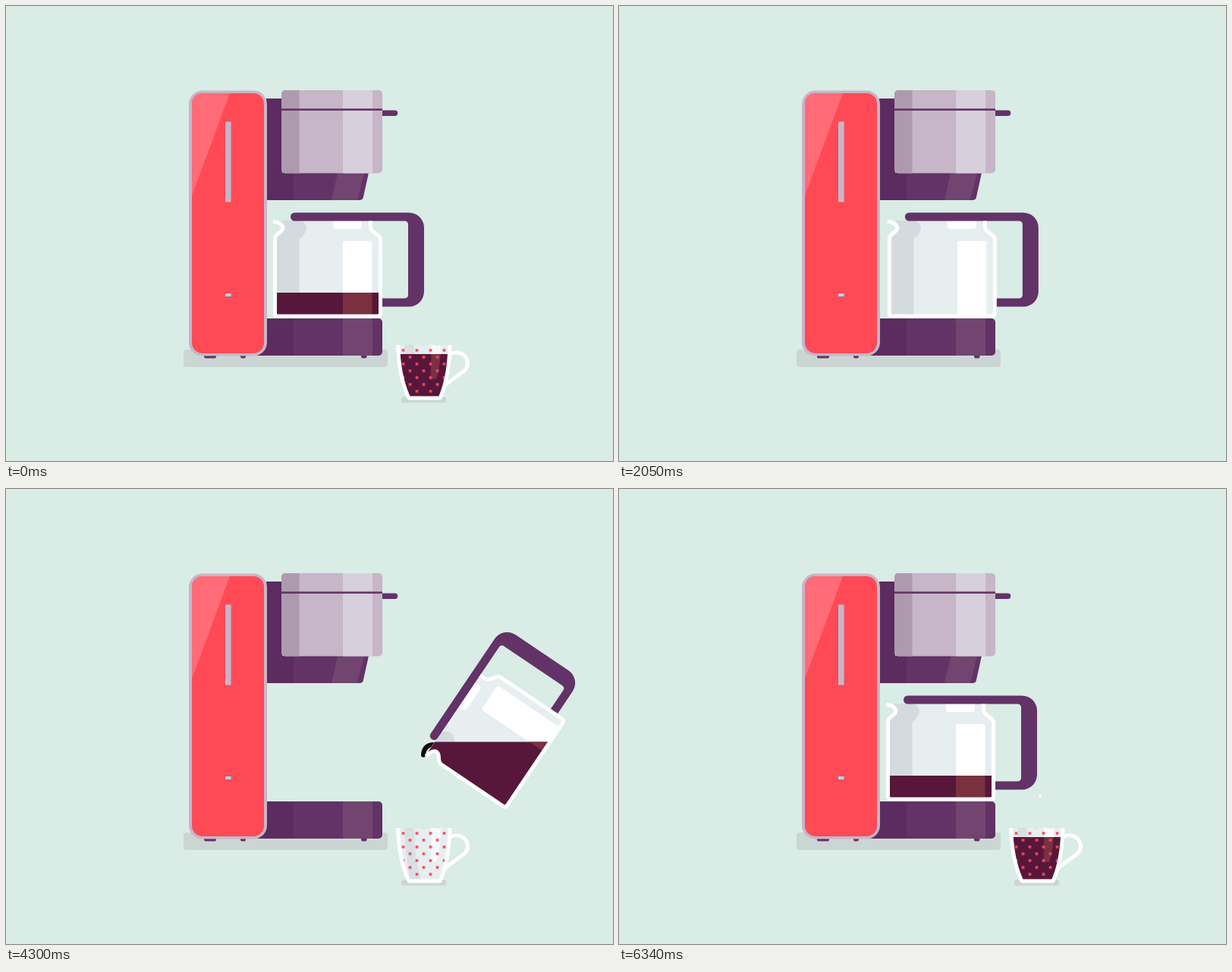
These frames come from a looping animation (800x600 px, 6.4 s). An HTML page:

```html
<!DOCTYPE html>
<html lang="en">
<head>
<meta charset="utf-8">
<title>Coffee maker</title>
<style>
  html, body { margin: 0; height: 100%; overflow: hidden; background: #d9ece5; }
  svg { display: block; width: 100vw; height: 100vh; }
  .red { fill: #ff4a56 } .gloss { fill: #ff6b76 }
  .plum { fill: #633267 } .plumDark { fill: #5c2b60 } .plumLight { fill: #71456f }
  .lilac { fill: #c6b6c8 } .lilacDark { fill: #ae9aae } .lilacLight { fill: #d8cfdd }
  .glass { fill: #e6eef0 } .shade { fill: #d4dbde } .white { fill: #fff }
  .coffee { fill: #57173a } .coffeeLight { fill: #7b3040 }
  .shadow { fill: #cbd6d4 }
  .line { fill: none; stroke: #fff; stroke-width: 5; stroke-linecap: round; stroke-linejoin: round }
  .stream { fill: none; stroke: #0d0709; stroke-width: 6; stroke-linecap: round }
</style>
</head>
<body>
<svg viewBox="0 0 800 600">
  <defs>
    <clipPath id="bodyClip"><rect x="245" y="115" width="95" height="343" rx="14"/></clipPath>
    <clipPath id="basketClip"><rect x="363" y="111" width="133" height="109.500" rx="5"/></clipPath>
    <clipPath id="baseClip"><rect x="325" y="412" width="171" height="49" rx="5"/></clipPath>
    <clipPath id="spoutClip"><path d="M344 220H478L470.800 252.500Q470 256 466 256H344Z"/></clipPath>
    <clipPath id="potClip"><path d="M353 283H480V294L492 306V407H356.500V304L366 294Z"/></clipPath>
    <clipPath id="stripClip"><rect x="444" y="310" width="38.500" height="96.500"/></clipPath>
    <clipPath id="cupClip"><path id="cupShape" d="M517 447Q518 490 532 515.500H571Q584 490 585 447Z"/></clipPath>
    <clipPath id="cupGloss"><path d="M560 447H573Q573 475 567 492H559Q561 475 560 447Z"/></clipPath>
    <pattern id="dots" x="521.700" y="452.300" width="18" height="18" patternUnits="userSpaceOnUse">
      <path fill="#f2495c" d="M0 0h3.600v3.600h-3.600zM9 9h3.600v3.600h-3.600z"/>
    </pattern>
  </defs>

  <rect id="shadow" class="shadow" x="234" y="453" width="269" height="23" rx="4"/>
  <g id="feet" class="plum">
    <rect x="261" y="457" width="16" height="7.500" rx="2"/>
    <rect x="309" y="457" width="7" height="7.500" rx="2"/>
    <rect x="468" y="457" width="7.500" height="7.500" rx="2"/>
  </g>

  <g id="cup">
    <rect class="shadow" x="521" y="515.500" width="59" height="7.500" rx="3"/>
    <path class="line" d="M582 462C588 456 597 455 603 460C610 466 610 475 604 481L577 501"/>
    <g clip-path="url(#cupClip)">
      <rect class="glass" x="510" y="447" width="80" height="72"/>
      <path class="shade" d="M525 447H538Q538 485 547 516H533Q526 485 525 447Z" opacity=".7"/>
      <path class="white" d="M560 447H573Q573 475 567 492H559Q561 475 560 447Z" opacity=".7"/>
      <path id="pour" class="stream" pathLength="1" d="M565 337Q550 337 550 352V512"/>
      <rect class="coffee cupCoffee" x="510" y="459" width="80" height="70"/>
      <g clip-path="url(#cupGloss)"><rect class="coffeeLight cupCoffee" x="510" y="459" width="80" height="70"/></g>
      <rect fill="url(#dots)" x="510" y="447" width="80" height="72"/>
    </g>
    <path class="line" style="stroke-linecap:butt" d="M516.500 447Q518 490 531 517H572Q584 490 585 447"/>
  </g>
  <path id="pourAir" class="stream" pathLength="1" d="M565 337Q550 337 550 352V512" clip-path="inset(0)"/>

  <g id="pot">
    <path class="glass" d="M353 283H480V294L493 306V409H355V304L366 294Z"/>
    <path class="shade" d="M357 304L367 293L362 283H388Q396 285 396 295Q394 302 386.500 307V408H357Z"/>
    <path class="white" d="M431 283H469V290Q469 294 465 294H435Q431 294 431 290Z"/>
    <rect class="white" x="444" y="310" width="38.500" height="98" rx="3"/>
    <path id="drip" class="stream" pathLength="1" d="M424 253V400"/>
    <g clip-path="url(#potClip)"><rect class="coffee potCoffee" x="224" y="346" width="400" height="300"/></g>
    <g clip-path="url(#stripClip)"><rect class="coffeeLight potCoffee" x="224" y="346" width="400" height="300"/></g>
    <path class="plum" d="M380.500 272.500H531A20 20 0 0 1 551 292.500V376.500A20 20 0 0 1 531 396.500H495V385.500H525Q530 385.500 530 380.500V288.500Q530 283.500 525 283.500H380.500A5.500 5.500 0 0 1 380.500 272.500Z"/>
    <path class="line" style="stroke-linecap:butt" d="M352 284Q364 286 365 292Q365 296 359 300Q354.500 303 354.500 308V405Q354.500 409 358.500 409H489.500Q493.500 409 493.500 405V308Q493.500 305 491 303L482.500 296Q480.500 294 480.500 291V283.500"/>
  </g>

  <g id="machine">
    <g id="arms">
      <rect class="plumDark" x="343" y="122" width="21" height="134"/>
      <g clip-path="url(#spoutClip)">
        <rect class="plum" x="344" y="220" width="140" height="36"/>
        <rect class="plumDark" x="344" y="220" width="35" height="36"/>
        <path class="plumLight" d="M437 220H472L463 256H429Z"/>
      </g>
      <g clip-path="url(#baseClip)">
        <rect class="plum" x="325" y="412" width="171" height="49"/>
        <rect class="plumDark" x="325" y="412" width="54" height="49"/>
        <rect class="plumLight" x="444" y="412" width="39" height="49"/>
      </g>
    </g>
    <g id="basket" clip-path="url(#basketClip)">
      <rect class="lilac" x="363" y="111" width="133" height="110"/>
      <rect class="lilacDark" x="363" y="111" width="23.500" height="110"/>
      <rect class="lilacLight" x="444" y="111" width="39" height="110"/>
    </g>
    <rect id="seam" class="plum" x="363" y="135.300" width="133" height="2.600"/>
    <path id="grip" class="plum" d="M496 137.500H512.500A3.700 3.700 0 0 1 512.500 145H496Z"/>
    <g id="body">
      <rect class="lilac" x="241" y="111.500" width="103" height="350" rx="18"/>
      <g clip-path="url(#bodyClip)">
        <rect class="red" x="245" y="115" width="95" height="343"/>
        <path class="gloss" d="M245 115H295L245 250Z"/>
      </g>
      <rect class="lilac" x="289" y="152.500" width="7.600" height="106"/>
      <rect fill="#9adcf0" x="289" y="379" width="7.600" height="4"/>
    </g>
  </g>

  <path id="steam" class="line" style="stroke-width:3" pathLength="1" d="M551 450Q545 440 550 430T555 404.500"/>
</svg>

<script>
const LOOP = 6400, HOLD = 1000, TICK = 30;
const $ = id => document.getElementById(id);
const all = name => document.querySelectorAll('.' + name);

const linear = p => p;
const easeOut = p => 1 - (1 - p) ** 3;
const easeInOut = p => p < .5 ? 2 * p * p : 1 - 2 * (1 - p) ** 2;
const mix = (a, b, p) => a + (b - a) * p;
const span = (t, from, to, ease = linear) =>
  ease(Math.min(1, Math.max(0, (t - from) / (to - from))));

const move = (el, transform) => el.setAttribute('transform', transform);
const show = (el, visible) => el.style.display = visible ? '' : 'none';

function scaleFrom(id, x, y, sx, sy) {
  show($(id), sx > 0 && sy > 0);
  move($(id), `translate(${x} ${y}) scale(${sx} ${sy}) translate(${-x} ${-y})`);
}

// Shows only the part of a path between two fractions of its length.
function trim(id, from, to) {
  const el = $(id);
  show(el, to > from);
  el.style.strokeDasharray = `${Math.max(0, to - from)} 2`;
  el.style.strokeDashoffset = -from;
}

function drawMachine(t) {
  scaleFrom('body', 292, 462, 1, span(t, 1060, 1300, easeOut));
  scaleFrom('arms', 344, 256, span(t, 1250, 1450, easeOut), 1);
  scaleFrom('basket', 430, 220, 1, span(t, 1390, 1560, easeOut));
  scaleFrom('seam', 363, 136, span(t, 1600, 1697), 1);
  scaleFrom('grip', 496, 141, span(t, 1690, 1800, easeOut), 1);
  move($('machine'), `translate(0 ${mix(3, 0, span(t, 1720, 1900, easeInOut))})`);
  show($('feet'), t > 1700);
  scaleFrom('shadow', 368.5, 476, span(t, 1700, 1950, easeOut), 1);
}

function drawPot(t) {
  const entry = 447 * (1 - span(t, 1630, 2130, easeOut));
  const away = span(t, 3700, 4200, easeInOut) - span(t, 5150, 5680, easeInOut);
  const angle = t < 4300 ? -56 * span(t, 3820, 4290, easeInOut)
    : mix(-56, -60, span(t, 4300, 4950)) * (1 - span(t, 4950, 5590, easeInOut));
  const slosh = t < 4300 ? 4 * Math.sin(span(t, 3700, 4300) * 2 * Math.PI)
    : t > 4950 ? 3.2 * Math.sin((t - 4950) * .00714) * Math.exp((5170 - t) / 250) : 0;

  const poured = span(t, 4400, 5080);
  const rest = mix(64, 15, span(t, 2180, 2800)) + 17 * poured;
  const level = rest + angle / 56 * mix(9, 15, poured);

  show($('pot'), t >= 1630);
  move($('pot'), `translate(${424 + 221 * away + entry} ${346 - 18.5 * away}) rotate(${angle}) translate(-424 -346)`);
  for (const el of all('potCoffee'))
    move(el, `rotate(${slosh - angle} 424 346) translate(0 ${level})`);

  if (t < 2820) trim('drip', span(t, 2700, 2820), span(t, 2100, 2220));
  else trim('drip', 0, .022 * Math.sin(Math.PI * span(t, 2820, 2930)) - .001);
}

function drawCup(t) {
  show($('cup'), t >= 3000);
  move($('cup'), `translate(${290 * (1 - span(t, 3000, 3600, easeOut))} 0)`);
  const empty = 57 * (1 - span(t, 4420, 5100));
  for (const el of all('cupCoffee')) move(el, `translate(0 ${empty})`);

  const head = span(t, 4280, 4440), tail = span(t, 5085, 5243);
  const rim = .59;
  trim('pour', tail, head);
  trim('pourAir', tail, Math.min(head, rim));
  trim('steam', span(t, 5900, 6350), span(t, 5700, 6080));
}

function frame(now) {
  const time = now % LOOP;
  const ticked = HOLD + TICK * Math.floor((time - HOLD) / TICK);
  // The opening hold shows the finished scene.
  const t = time < HOLD ? LOOP + HOLD : Math.min(ticked, 6340);
  const blank = t < 1090;
  drawMachine(blank ? 0 : t);
  drawPot(t);
  drawCup(t);
  requestAnimationFrame(frame);
}

$('pourAir').removeAttribute('clip-path');
requestAnimationFrame(frame);
</script>
</body>
</html>
```
